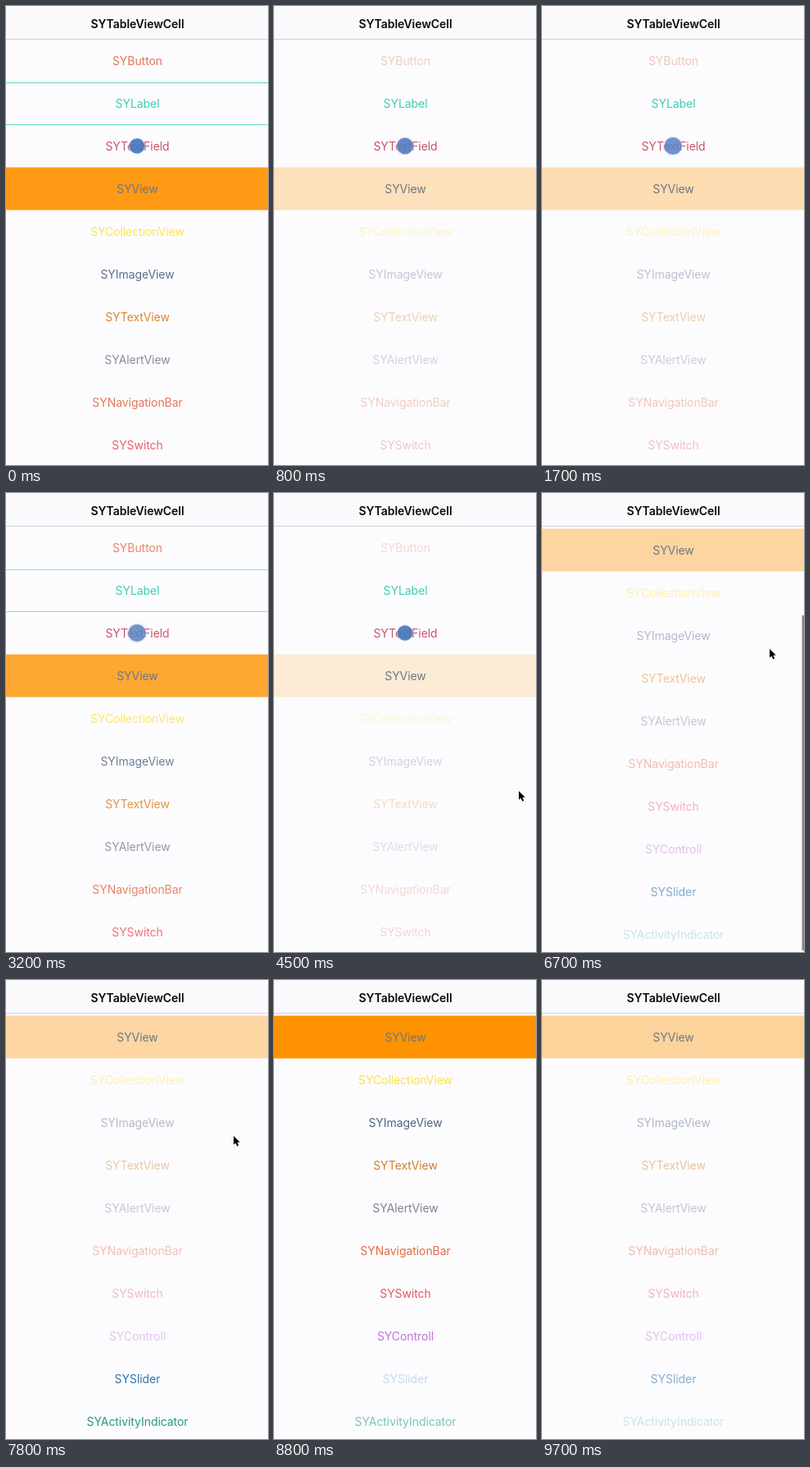
Animation of 320 by 559 pixels, one loop 9.8 s. Source, as an HTML page with a canvas:

```html
<!DOCTYPE html>
<html>
<head>
<meta charset="utf-8">
<style>
html, body { margin: 0; width: 100%; height: 100%; overflow: hidden; background: #fcfcff; }
canvas { display: block; width: 320px; height: 559px; }
</style>
</head>
<body>
<canvas id="stage"></canvas>
<script>
const W = 320, H = 559, LOOP = 9800, STEP = 100;
const TOP = 40.5, ROW = 52, MAX_SCROLL = 153;
const DRAG_START = 5600, DRAG_TIME = 900;
const PAGE = [252, 252, 255], FILL = [255, 146, 0], BORDER = [70, 210, 180];
const canvas = document.getElementById('stage');
const ctx = canvas.getContext('2d');
const ratio = window.devicePixelRatio || 1;
canvas.width = W * ratio;
canvas.height = H * ratio;
ctx.scale(ratio, ratio);

// steady rows keep their text colour; peak is the time of full brightness
const rows = [
  { name: 'SYButton', color: [225, 108, 72] },
  { name: 'SYLabel', color: [58, 206, 178], steady: true },
  { name: 'SYTextField', color: [203, 82, 102], steady: true },
  { name: 'SYView', color: [108, 120, 132], steady: true },
  { name: 'SYCollectionView', color: [252, 225, 70] },
  { name: 'SYImageView', color: [82, 98, 132] },
  { name: 'SYTextView', color: [215, 125, 35] },
  { name: 'SYAlertView', color: [125, 133, 145] },
  { name: 'SYNavigationBar', color: [228, 108, 70] },
  { name: 'SYSwitch', color: [235, 85, 95] },
  { name: 'SYControll', color: [195, 115, 210] },
  { name: 'SYSlider', color: [30, 105, 165], peak: 7500 },
  { name: 'SYActivityIndicator', color: [28, 150, 122], peak: 8000 }
];
const cursorPath = [
  [4200, [322, 374]], [4500, [299, 363]], [5100, [274, 352]], [5600, [274, 352]]
];

const clamp = (v) => Math.max(0, Math.min(1, v));
const smooth = (x) => x * x * (3 - 2 * x);
const mix = (a, b, p) => a.map((v, i) => v + (b[i] - v) * p);
const rgb = (c) => `rgb(${c.map(Math.round).join(',')})`;
const faded = (color, alpha) => rgb(mix(PAGE, color, alpha));
const pulse = (t, peak = 5750, period = 3020) =>
  0.5 + 0.5 * Math.cos((t - peak) / period * 2 * Math.PI);

function along(stops, x) {
  const i = stops.findIndex(([at]) => at >= x);
  if (i < 0) return stops[stops.length - 1][1];
  if (i === 0) return stops[0][1];
  const [a, from] = stops[i - 1], [b, to] = stops[i];
  return mix(from, to, (x - a) / (b - a));
}

function rect(x, y, w, h, color) {
  ctx.fillStyle = color;
  ctx.fillRect(x, y, w, h);
}

function disc(y, radius, color) {
  ctx.beginPath();
  ctx.arc(W / 2, y, radius, 0, 2 * Math.PI);
  ctx.fillStyle = color;
  ctx.fill();
}

function label(text, y, color, weight) {
  ctx.font = `${weight} 14px Inter, sans-serif`;
  ctx.letterSpacing = '-0.06px';
  ctx.textAlign = 'center';
  ctx.textBaseline = 'alphabetic';
  ctx.fillStyle = color;
  ctx.fillText(text, W / 2 + 0.5, y);
}

function drawRow(row, i, t, scroll) {
  const top = Math.round(TOP + ROW * i - scroll);
  if (top > H || top < -ROW) return;
  const glow = pulse(t, row.peak);
  if (row.name === 'SYView') rect(0, top - 0.5, W, ROW, faded(FILL, 0.1 + 0.9 * glow));
  if (row.name === 'SYLabel') {
    const color = faded(BORDER, glow * glow);
    rect(0, top, W, 1, color);
    rect(0, top + ROW - 1, W, 1, color);
  }
  label(row.name, top + 31, faded(row.color, row.steady ? 1 : 0.2 + 0.8 * glow), 400);
  if (row.name === 'SYTextField') drawDot(t, top + ROW / 2 - 0.5);
}

function drawDot(t, y) {
  const grow = 1 - pulse(t, 5700, 1500);
  disc(y, 9 + 4 * grow, `rgba(205,212,238,${0.3 + 0.3 * grow})`);
  disc(y, 8.3 + 3 * grow, `rgba(62,112,184,${1 - 0.4 * grow})`);
}

function drawScrollbar(t, scroll) {
  ctx.globalAlpha = clamp((t - DRAG_START) / 100) * clamp((7400 - t) / 300);
  rect(317.5, 43.5 + scroll * 0.69, 2.5, 408, '#858585');
  ctx.globalAlpha = 1;
}

function drawCursor(t, drag) {
  if (t < 4200 || t > 8600) return;
  const [x, y] = t < DRAG_START ? along(cursorPath, t) : [274 + 4 * drag, 352 - 162 * drag];
  const shape = [[0, 0], [0, 10.6], [2.5, 8.4], [4.3, 12.4], [6.2, 11.5], [4.4, 7.7], [7.6, 7.5]];
  ctx.beginPath();
  shape.forEach(([dx, dy]) => ctx.lineTo(x + dx, y + dy));
  ctx.closePath();
  ctx.lineJoin = 'round';
  ctx.lineWidth = 2;
  ctx.strokeStyle = '#fcfcff';
  ctx.stroke();
  ctx.fillStyle = '#000';
  ctx.fill();
}

function draw(t) {
  const drag = smooth(clamp((t - DRAG_START) / DRAG_TIME));
  const scroll = MAX_SCROLL * drag;
  rect(0, 0, W, H, rgb(PAGE));
  rows.forEach((row, i) => drawRow(row, i, t, scroll));
  drawScrollbar(t, scroll);
  rect(0, 0, W, 40, '#faf9fb');
  rect(0, 40, W, 1, '#d2d2da');
  label('SYTableViewCell', 27, '#0a0a0a', 600);
  drawCursor(t, drag);
}

const start = performance.now();
function tick() {
  const t = (performance.now() - start) % LOOP;
  draw(Math.floor(t / STEP) * STEP);
  requestAnimationFrame(tick);
}
tick();
</script>
</body>
</html>
```
